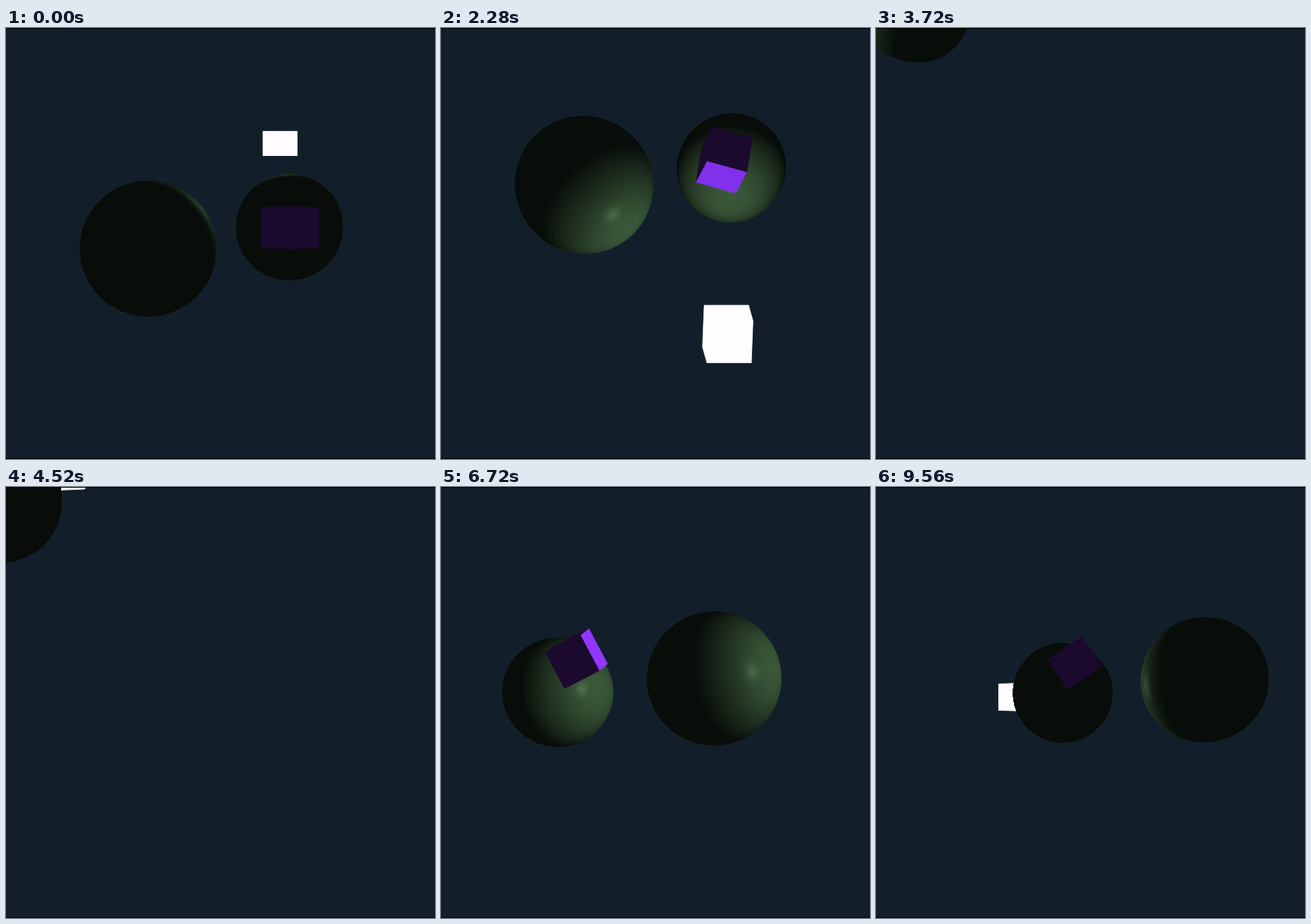
An HTML page with a canvas for the animation above (9.6 s loop, 600x603 px).

```html
<!DOCTYPE html>
<html lang="en">
<head>
<meta charset="utf-8">
<title>Orbiting light</title>
<style>
html, body { margin: 0; width: 100%; height: 100%; overflow: hidden; background: #121f2a; }
canvas { display: block; }
</style>
</head>
<body>
<canvas id="stage" width="600" height="603"></canvas>
<script>
const W = 600, H = 603, CX = 300, CY = 301.5, FOCAL = 728;
const LOOP = 9600, STEP = 40, CUT = 4000;
const LAMP_SIDE = 0.55, CUBE_SIDE = 0.5;
const ctx = document.getElementById('stage').getContext('2d', { willReadFrequently: true });

// Camera path: time, near sphere's screen x and y, its depth, swing and tilt in degrees
const path = [
  [0, 200.5, 308.5, 7.73, 42, 0],
  [1040, 200.5, 308.5, 7.73, 42, 0],
  [1400, 180, 242, 7.62, 43, 5],
  [2020, 174, 207, 7.62, 42, 5],
  [3080, 287.5, 263.5, 7.77, 33, 3.5],
  [3720, -269, -67, 7.4, 33, 3.5],
  [CUT, -500, -300, 7.6, 33, 0],
  [4960, 384.5, 268.5, 7.73, 33, 0],
  [6600, 380, 268, 7.75, 33, 0],
  [7720, 386.5, 271.5, 8.6, 34, 0],
  [8960, 457.5, 270, 8.38, 41.5, 0]
];

// The scene on either side of the cut. Each triple is [mean, sine, cosine] over time;
// the orbit is x, y, z from the near sphere and the turns are yaw, pitch, roll.
const firstView = {
  side: 1, farY: -0.38, cubeY: -0.27, cubeAngle: 76,
  orbit: [[0.656, 3.174, 1.754], [-0.912, 2.555, -1.438], [1.307, -0.966, 2.793]],
  lampTurn: [[8.6, 11.4, 36.4], [6.6, 12.7, -6.6], [0, 3, 0]],
  cubeTurn: [[30.9, -14.5, 14.1], [15.6, 12.9, -13.6], [5, 1.4, -5]]
};
const secondView = {
  side: -1, farY: 0.17, cubeY: -0.19, cubeAngle: 70,
  orbit: [[-0.279, -0.843, 3.204], [-0.392, 2.053, -0.927], [0.743, -3.629, -1.259]],
  lampTurn: [[17.8, 15.2, -29.5], [8.9, -3.9, 7.5], [-1.6, 2.9, -2]],
  cubeTurn: [[-11, -14, 1.9], [-2.8, 7.9, -3.9], [-34, 17.3, -1.4]]
};

const radians = degrees => degrees * Math.PI / 180;
const dot = (a, b) => a[0] * b[0] + a[1] * b[1] + a[2] * b[2];
const subtract = (a, b) => a.map((n, i) => n - b[i]);
const add = (a, b) => a.map((n, i) => n + b[i]);
const project = ([x, y, z]) => [CX + FOCAL * x / z, CY + FOCAL * y / z];
const wave = (triples, t) => triples.map(([mean, s, c]) =>
  mean + s * Math.sin(t / 1000) + c * Math.cos(t / 1000));

function cameraAt(t) {
  const next = path.findIndex(key => key[0] > t);
  if (next < 0) return path[path.length - 1].slice(1);
  const from = path[next - 1], to = path[next];
  const u = (t - from[0]) / (to[0] - from[0]);
  return from.slice(1).map((n, i) => n + (to[i + 1] - n) * u);
}

function drawSphere(centre, lamp) {
  const [px, py] = project(centre);
  const reach = 1.3 * FOCAL / centre[2];
  const left = Math.max(0, Math.floor(px - reach)), right = Math.min(W, Math.ceil(px + reach));
  const top = Math.max(0, Math.floor(py - reach)), bottom = Math.min(H, Math.ceil(py + reach));
  if (left >= right || top >= bottom) return;
  const image = ctx.getImageData(left, top, right - left, bottom - top);
  const spare = dot(centre, centre) - 1;
  let at = 0;
  for (let y = top; y < bottom; y++) {
    for (let x = left; x < right; x++, at += 4) {
      const dx = x + 0.5 - CX, dy = y + 0.5 - CY;
      const length = Math.hypot(dx, dy, FOCAL);
      const ray = [dx / length, dy / length, FOCAL / length];
      const along = dot(ray, centre);
      const inside = along * along - spare;
      if (inside < 0) continue;
      const hit = ray.map(n => n * (along - Math.sqrt(inside)));
      const normal = subtract(hit, centre);
      const toLamp = subtract(lamp, hit);
      const distance = Math.hypot(...toLamp);
      const diffuse = Math.max(0, dot(normal, toLamp) / distance);
      const mirror = dot(toLamp, ray) / distance - 2 * diffuse * dot(normal, ray);
      const shine = diffuse && Math.max(0, -2 * diffuse * dot(normal, ray) + dot(toLamp, ray) * -1 / distance * -1, mirror) ** 32;
      image.data[at] = 8 + 50 * diffuse + 20 * shine;
      image.data[at + 1] = 13 + 75 * diffuse + 29 * shine;
      image.data[at + 2] = 9 + 48 * diffuse + 22 * shine;
    }
  }
  ctx.putImageData(image, left, top);
}

function rotate([x, y, z], [yaw, pitch, roll]) {
  const turn = (a, b, degrees) => {
    const c = Math.cos(radians(degrees)), s = Math.sin(radians(degrees));
    return [a * c - b * s, a * s + b * c];
  };
  [z, x] = turn(z, x, yaw);
  [y, z] = turn(y, z, pitch);
  [x, y] = turn(x, y, roll);
  return [x, y, z];
}

// Draws the faces turned to the viewer; normals point towards the viewer along +z
function drawBox(centre, side, angles, colour) {
  const [cx, cy] = project(centre);
  const half = side / 2 * FOCAL / centre[2];
  const axes = [[1, 0, 0], [0, 1, 0], [0, 0, 1]].map(axis => rotate(axis, angles));
  axes.forEach((axis, k) => {
    const normal = axis.map(n => axis[2] < 0 ? -n : n);
    const p = axes[(k + 1) % 3], q = axes[(k + 2) % 3];
    ctx.beginPath();
    for (const [a, b] of [[-1, -1], [1, -1], [1, 1], [-1, 1]]) {
      const [x, y] = normal.map((n, i) => half * (n + a * p[i] + b * q[i]));
      ctx.lineTo(cx + x, cy + y);
    }
    ctx.closePath();
    ctx.fillStyle = ctx.strokeStyle = colour(normal);
    ctx.lineWidth = 0.8;
    ctx.fill();
    ctx.stroke();
  });
}

function draw(t) {
  const view = t < CUT ? firstView : secondView;
  const [x, y, depth, swing, tilt] = cameraAt(t);
  const near = [(x - CX) / FOCAL * depth, (y - CY) / FOCAL * depth, depth];
  const around = (distance, degrees, height) => {
    const z = distance * Math.sin(radians(degrees));
    const sideways = view.side * distance * Math.cos(radians(degrees));
    return add(near, [sideways, height - z * Math.sin(radians(tilt)), z]);
  };
  const far = around(3.16, swing, view.farY);
  const cube = around(2.31, swing - view.cubeAngle, view.cubeY);
  const lamp = add(near, wave(view.orbit, t));

  const toLamp = subtract(lamp, cube);
  toLamp[2] *= -1;
  const purple = normal => {
    const lit = Math.max(0, dot(normal, toLamp) / Math.hypot(...toLamp));
    return `rgb(${28 + 130 * lit}, ${10 + 50 * lit}, ${46 + 240 * lit})`;
  };

  ctx.fillStyle = '#121f2a';
  ctx.fillRect(0, 0, W, H);
  const parts = [
    [near, () => drawSphere(near, lamp)],
    [far, () => drawSphere(far, lamp)],
    [cube, () => drawBox(cube, CUBE_SIDE, wave(view.cubeTurn, t), purple)],
    [lamp, () => drawBox(lamp, LAMP_SIDE, wave(view.lampTurn, t), () => '#fffdff')]
  ];
  parts.sort((a, b) => b[0][2] - a[0][2]).forEach(([, paint]) => paint());
  ctx.fillStyle = '#000';
  ctx.fillRect(0, 0, W, 1);
  ctx.fillRect(0, H - 1, W, 1);
}

function tick() {
  draw(Math.floor(performance.now() % LOOP / STEP) * STEP);
  requestAnimationFrame(tick);
}
tick();
</script>
</body>
</html>
```
